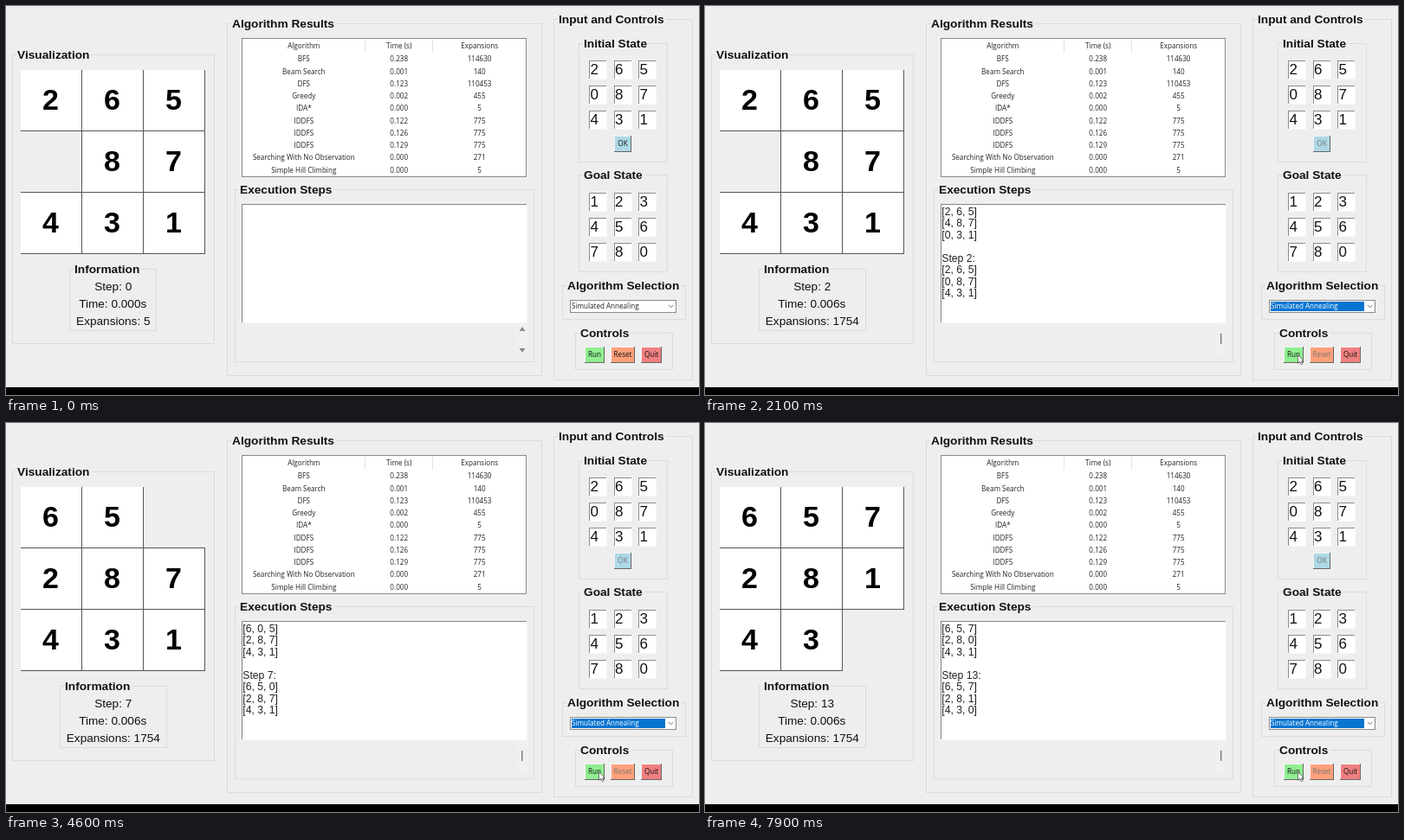
Write an HTML page with a canvas that moves like this. It is 800 px wide and 450 px high and loops after 8000 ms.

```html
<!DOCTYPE html>
<html lang="en">
<head>
<meta charset="utf-8">
<title>8-puzzle solver</title>
<style>
html, body { margin: 0; width: 100%; height: 100%; overflow: hidden; background: #eee; }
canvas { display: block; width: 800px; height: 450px; }
</style>
</head>
<body>
<canvas id="stage" width="800" height="450"></canvas>
<script>
const ctx = document.getElementById('stage').getContext('2d');
const LOOP = 8000, RUN_AT = 870, STEP_MS = 530;
const ARIAL = '"Liberation Sans", Arial, sans-serif';
const UI = '"Open Sans", "Noto Sans", sans-serif';
const BG = '#eeeeee';

// The blank moves from cell to cell; every board follows from these moves.
const START = '265087431';
const BLANKS = [6, 3, 6, 3, 0, 1, 2, 1, 2, 1, 2, 5, 8];
const boards = [START];
for (const to of BLANKS) {
  const b = [...boards[boards.length - 1]];
  b[b.indexOf('0')] = b[to];
  b[to] = '0';
  boards.push(b.join(''));
}

const RESULTS = [
  ['Algorithm', 'Time (s)', 'Expansions'],
  ['BFS', '0.238', '114630'],
  ['Beam Search', '0.001', '140'],
  ['DFS', '0.123', '110453'],
  ['Greedy', '0.002', '455'],
  ['IDA*', '0.000', '5'],
  ['IDDFS', '0.122', '775'],
  ['IDDFS', '0.126', '775'],
  ['IDDFS', '0.129', '775'],
  ['Searching With No Observation', '0.000', '271'],
  ['Simple Hill Climbing', '0.000', '5']
];

function fill(x, y, w, h, color) {
  ctx.fillStyle = color;
  ctx.fillRect(x, y, w, h);
}

function edge(x, y, w, h, color) {
  ctx.strokeStyle = color;
  ctx.lineWidth = 1;
  ctx.strokeRect(x + 0.5, y + 0.5, w - 1, h - 1);
}

function poly(points, color) {
  ctx.beginPath();
  points.forEach(([x, y]) => ctx.lineTo(x, y));
  ctx.closePath();
  ctx.fillStyle = color;
  ctx.fill();
}

// y is the middle of the capitals
function text(s, x, y, size, { family = ARIAL, weight = 400, color = '#111', align = 'center' } = {}) {
  ctx.font = `${weight} ${size}px ${family}`;
  ctx.textAlign = align;
  ctx.fillStyle = color;
  ctx.fillText(s, x, y + size * 0.358);
}

const small = (s, x, y, color = '#222', align = 'center') =>
  text(s, x, y, 8.1, { family: UI, color, align });

function group(title, x1, y1, x2, y2) {
  edge(x1, y1, x2 - x1 + 1, y2 - y1 + 1, '#dcdcdc');
  ctx.font = `700 13.7px ${ARIAL}`;
  fill(x1 + 5, y1 - 6, ctx.measureText(title).width + 3, 14, BG);
  text(title, x1 + 6, y1 + 0.4, 13.7, { weight: 700, align: 'left' });
}

function bevel(x, y, w, h, face, light, dark) {
  fill(x, y, w, h, face);
  fill(x, y, w, 1, light);
  fill(x, y, 1, h, light);
  fill(x, y + h - 1, w, 1, dark);
  fill(x + w - 1, y, 1, h, dark);
}

function button(label, x, y, w, face, off) {
  bevel(x, y, w, 19, face, '#f4f4f4', '#666');
  small(label, x + w / 2, y + 9.3, off ? '#757575' : '#111');
}

function entries(cells, top) {
  [...cells].forEach((c, i) => {
    const x = 673 + (i % 3) * 28.5, y = top + Math.floor(i / 3) * 29;
    bevel(Math.round(x), y, 21, 22, '#fff', '#8c8c8c', '#f8f8f8');
    text(c, x + 1.5, y + 10.4, 17, { align: 'left' });
  });
}

function drawBoard(board) {
  ctx.save();
  ctx.beginPath();
  ctx.rect(17, 74, 213, 213);
  ctx.clip();
  [...board].forEach((c, i) => {
    if (c === '0') return;
    const x = 16 + (i % 3) * 71, y = 73 + Math.floor(i / 3) * 71;
    fill(x, y, 72, 72, '#fff');
    edge(x, y, 72, 72, '#555');
    text(c, x + 35.5, y + 35.3, 34, { weight: 700, color: '#000' });
  });
  ctx.restore();
}

function drawInfo(step) {
  const on = step >= 0;
  if (on) group('Information', 62, 304, 185, 375);
  else group('Information', 73, 304, 173, 375);
  text(`Step: ${Math.max(step, 0)}`, 123.7, 324, 13.6);
  text(`Time: ${on ? '0.006' : '0.000'}s`, 123.2, 344, 13.6);
  text(`Expansions: ${on ? 1754 : 5}`, 123.8, 364, 13.6);
}

function drawResults() {
  bevel(272, 37, 329, 161, '#fff', '#8a8a8a', '#8a8a8a');
  for (const x of [414, 492]) fill(x, 39, 1, 15, '#e3e3e3');
  RESULTS.forEach((row, r) => {
    const y = r ? 47.3 + r * 14.25 : 46;
    row.forEach((s, c) => small(s, [343.8, 453.7, 546.6][c], y));
  });
}

const rows = b => [0, 3, 6].map(i => `[${[...b.slice(i, i + 3)].join(', ')}]`);

function drawLog(step) {
  bevel(272, 229, 330, 138, '#fff', '#858585', '#f6f6f6');
  if (step >= 0) {
    const lines = [`Step ${step}:`, ...rows(boards[step])];
    if (step > 0) lines.unshift(...rows(boards[step - 1]), '');
    lines.forEach((s, i) => text(s, 273.3, 237.5 + i * 13.5, 12.2, { align: 'left', color: '#222' }));
  }
  fill(589, 367, 14, 38, '#f0f0f0');
  if (step > 0) {
    fill(595, 379, 1.4, 12, '#777');
  } else {
    poly([[592.5, 376], [596, 371.3], [599.5, 376]], '#888');
    poly([[592.5, 396], [596, 400.7], [599.5, 396]], '#888');
  }
}

function drawControls(running, focused) {
  entries(START, 63);
  button('OK', 702, 150, 20, '#add8e6', running);
  entries('123456780', 216);

  fill(651, 340, 123, 15, '#fff');
  edge(651, 340, 123, 15, '#8a8a8a');
  if (focused) fill(653, 342, 108, 11, '#0874d0');
  small('Simulated Annealing', 653, 347, focused ? '#fff' : '#222', 'left');
  ctx.beginPath();
  ctx.moveTo(765, 346);
  ctx.lineTo(767.7, 348.7);
  ctx.lineTo(770.4, 346);
  ctx.strokeStyle = '#777';
  ctx.stroke();

  button('Run', 668, 394, 23, '#90ee90', false);
  button('Reset', 698, 394, 28, '#ffa07a', running);
  button('Quit', 733, 394, 24, '#f08080', false);
}

function drawPointer(t) {
  if (t < 200) return;
  const ease = p => { p = Math.min(1, Math.max(0, p)); return p * p * (3 - 2 * p); };
  const a = ease((t - 200) / 550), b = ease((t - 1200) / 400);
  const x = 735 - 44.5 * a - 6 * b, y = 352 + 49.5 * a + 2.3 * b;
  const shape = [[0, 0], [0, 9.5], [2.2, 7.6], [3.8, 11], [5.4, 10.2], [3.9, 7], [6.6, 6.7]];
  poly(shape.map(([dx, dy]) => [x + dx, y + dy]), '#fff');
  ctx.strokeStyle = '#444';
  ctx.lineWidth = 0.7;
  ctx.stroke();
}

function draw(t) {
  const step = Math.min(boards.length - 1, Math.floor((t - RUN_AT) / STEP_MS));
  fill(0, 0, 800, 450, BG);
  group('Visualization', 7, 56, 240, 390);
  group('Algorithm Results', 255, 20, 618, 427);
  group('Execution Steps', 264, 212, 609, 411);
  group('Input and Controls', 632, 15, 792, 432);
  group('Initial State', 661, 43, 763, 180);
  group('Goal State', 661, 195, 763, 307);
  group('Algorithm Selection', 642, 323, 784, 362);
  group('Controls', 657, 378, 769, 420);
  drawBoard(boards[Math.max(step, 0)]);
  drawInfo(step);
  drawResults();
  drawLog(step);
  drawControls(step >= 0, t >= 100);
  drawPointer(t);
  fill(0, 441, 800, 9, '#000');
}

let began;
function tick(now) {
  began ??= now;
  draw((now - began) % LOOP);
  requestAnimationFrame(tick);
}
draw(0);
requestAnimationFrame(tick);
</script>
</body>
</html>
```
